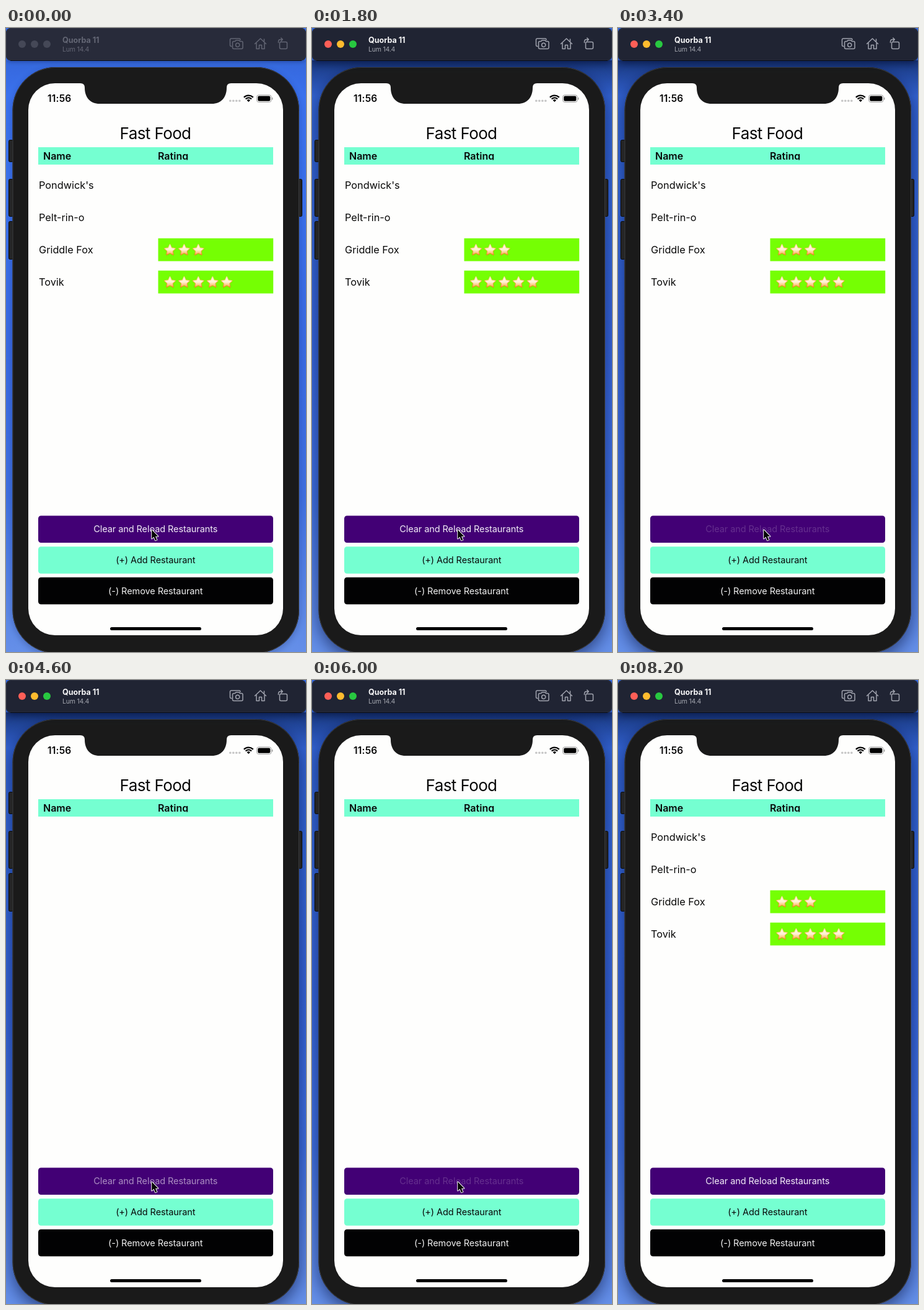
These frames come from a looping animation (484 by 1005 pixels, 8.4 s). An HTML page with a canvas:

```html
<!DOCTYPE html>
<html lang="en">
<head>
<meta charset="utf-8">
<title>Fast Food</title>
<style>
html, body { margin: 0; width: 100%; height: 100%; overflow: hidden; background: #356be0; }
canvas { display: block; width: 484px; height: 1005px; }
</style>
</head>
<body>
<canvas id="stage"></canvas>
<script>
const W = 484, H = 1005, LOOP = 8400, STEP = 200;
const canvas = document.getElementById('stage');
const dpr = window.devicePixelRatio || 1;
canvas.width = W * dpr;
canvas.height = H * dpr;
const ctx = canvas.getContext('2d');
ctx.scale(dpr, dpr);

const MINT = '#75ffd1', LIME = '#75ff03', PAPER = '#fefefd';
const ROWS = [['Pondwick\'s', 0], ['Pelt-rin-o', 0], ['Griddle Fox', 3], ['Tovik', 5]];

// Moments of the two long presses, in ms
const ACTIVE = 600, CLEARED = 4600, RELOADED = 7000, CURSOR_GONE = 7200;
const PRESSES = [[1900, 4475], [5300, 6850]];

function rect(x, y, w, h, r, fill, stroke, width = 1) {
  ctx.beginPath();
  ctx.roundRect(x, y, w, h, r);
  if (fill) { ctx.fillStyle = fill; ctx.fill(); }
  if (stroke) { ctx.strokeStyle = stroke; ctx.lineWidth = width; ctx.stroke(); }
}

function disc(x, y, r, fill) {
  ctx.beginPath();
  ctx.arc(x, y, r, 0, Math.PI * 2);
  ctx.fillStyle = fill;
  ctx.fill();
}

function text(str, x, y, size, { color = '#080808', weight = 400, align = 'left', gap = 0 } = {}) {
  ctx.font = `${weight} ${size}px Inter, Roboto, sans-serif`;
  ctx.letterSpacing = gap + 'px';
  ctx.textAlign = align;
  ctx.fillStyle = color;
  ctx.fillText(str, x, y);
}

function vertical(y0, y1, ...stops) {
  const g = ctx.createLinearGradient(0, y0, 0, y1);
  stops.forEach((c, i) => g.addColorStop(i / (stops.length - 1), c));
  return g;
}

function withShadow(color, blur, dy, draw) {
  ctx.save();
  ctx.shadowColor = color;
  ctx.shadowBlur = blur * dpr;
  ctx.shadowOffsetY = dy * dpr;
  draw();
  ctx.restore();
}

function shade(y0, y1, alpha) {
  ctx.fillStyle = vertical(y0, y1, `rgba(0,12,45,${alpha})`, 'rgba(0,12,45,0)');
  ctx.fillRect(0, y0, W, y1 - y0);
}

function desktop(active) {
  ctx.fillStyle = vertical(0, H, '#3b72f0', '#3a70ec', '#3969e2', '#3f6fe0', '#658fe8');
  ctx.fillRect(0, 0, W, H);
  shade(52, 110, active ? 0.5 : 0.1);
  if (active) shade(52, 700, 0.18);
}

function deviceButton(x, y, w, h) {
  rect(x, y, w, h, 2, '#252525', '#090909');
}

function phone(active) {
  withShadow(active ? 'rgba(0,10,50,.55)' : 'rgba(0,10,50,.25)', active ? 26 : 12, active ? 10 : 4,
    () => rect(10.5, 63, 462.5, 944, 69, '#1b1b1b'));
  deviceButton(4.5, 180.5, 7, 35);
  deviceButton(4.5, 243.5, 7, 60);
  deviceButton(4.5, 311.5, 7, 61);
  deviceButton(471.5, 243.5, 6, 60);
  rect(11, 63.5, 461.5, 943, 69, '#1a1a1a', '#3d3e40');
  rect(36, 89, 411, 889, 43, PAPER);
  notch();
}

function notch() {
  ctx.beginPath();
  ctx.moveTo(120, 88);
  ctx.lineTo(120, 89);
  ctx.quadraticCurveTo(127, 89, 127, 96);
  ctx.bezierCurveTo(127, 112, 136, 122, 151, 122);
  ctx.lineTo(332, 122);
  ctx.bezierCurveTo(347, 122, 356, 112, 356, 96);
  ctx.quadraticCurveTo(356, 89, 363, 89);
  ctx.lineTo(363, 88);
  ctx.closePath();
  ctx.fillStyle = '#1a1a1a';
  ctx.fill();
}

function strokePath(d, color, width = 1.5) {
  ctx.strokeStyle = color;
  ctx.lineWidth = width;
  ctx.lineJoin = ctx.lineCap = 'round';
  ctx.stroke(new Path2D(d));
}

function titleBar(active) {
  withShadow(active ? 'rgba(0,8,40,.6)' : 'rgba(0,8,40,.3)', active ? 14 : 7, active ? 4 : 2,
    () => rect(0, 0, W, 52.5, 8, '#111622'));
  rect(0.5, 0.5, W - 1, 51.5, 8, active ? '#202433' : '#282b3a', active ? '#2c303e' : '#303442');
  ctx.fillStyle = '#090c14';
  ctx.fillRect(7, 52, W - 14, 1);

  const lights = active ? ['#fe5f57', '#febb2e', '#28c840'] : Array(3).fill('#454857');
  lights.forEach((c, i) => disc(26 + i * 20, 26, 6, c));
  text('Quorba 11', 91, 24, 12.5, { weight: 700, color: active ? '#f7f7f8' : '#646775' });
  text('Lum 14.4', 91, 38, 10.5, { color: active ? '#a3a6af' : '#646775', gap: -0.2 });

  const ink = active ? '#a0a3ae' : '#626573';
  strokePath('M364 29.5H363.5Q361.5 29.5 361.5 27.5V19Q361.5 17 363.5 17H376Q378 17 378 19', ink);
  strokePath('M367.5 21.5H369.5L371 19.8H376L377.5 21.5H380Q382 21.5 382 23.5V31.5Q382 33.5 380 33.5H367.5Q365.5 33.5 365.5 31.5V23.5Q365.5 21.5 367.5 21.5Z', ink);
  strokePath('M376.8 27.3A3.1 3.1 0 1 1 370.6 27.3A3.1 3.1 0 1 1 376.8 27.3Z', ink);
  strokePath('M401.5 25.5L410.5 17L419.5 25.5M404 24V33.5H408.5V27.5H412.5V33.5H417V24M416.5 18V21.5', ink);
  strokePath('M443.5 22.5H451.5Q453.5 22.5 453.5 24.5V31.5Q453.5 33.5 451.5 33.5H443.5Q441.5 33.5 441.5 31.5V24.5Q441.5 22.5 443.5 22.5Z', ink);
  strokePath('M439.5 23.5V22Q439.5 18.5 443 18.5H446M443.8 16L446.3 18.5L443.8 21', ink);
}

function statusBar() {
  text('11:56', 67, 119, 15.5, { weight: 600, gap: 0.2 });
  for (let i = 0; i < 4; i++) disc(361.8 + i * 5, 117.3, 1.8, '#c6c6c6');
  for (const r of [10.2, 6.4]) {
    ctx.beginPath();
    ctx.arc(391.3, 118.8, r, -Math.PI * 0.76, -Math.PI * 0.24);
    ctx.strokeStyle = '#050505';
    ctx.lineWidth = 2.3;
    ctx.lineCap = 'butt';
    ctx.stroke();
  }
  ctx.beginPath();
  ctx.moveTo(391.3, 119.2);
  ctx.arc(391.3, 118.8, 3.7, -Math.PI * 0.76, -Math.PI * 0.24);
  ctx.fillStyle = '#050505';
  ctx.fill();
  rect(404.5, 107.9, 23.5, 11.6, 3.4, null, '#a0a0a0');
  rect(406.2, 109.6, 20.1, 8.2, 2, '#000');
  rect(429, 111.8, 1.4, 4, 1, '#a0a0a0');
}

function star(x, y) {
  ctx.beginPath();
  for (let i = 0; i < 10; i++) {
    const r = i % 2 ? 4.5 : 9, a = -Math.PI / 2 + i * Math.PI / 5;
    ctx.lineTo(x + r * Math.cos(a), y + r * Math.sin(a));
  }
  ctx.closePath();
  ctx.lineJoin = 'round';
  ctx.lineWidth = 1.8;
  ctx.strokeStyle = vertical(y - 9, y + 8, '#f3d878', '#f3ab35', '#ea7a1c');
  ctx.stroke();
  ctx.fillStyle = vertical(y - 8, y + 7, '#fff9df', '#fff1d2', '#fbae4c');
  ctx.fill();
}

function table(showRows) {
  text('Fast Food', 241, 178.5, 26, { align: 'center', gap: -0.6 });
  ctx.fillStyle = MINT;
  ctx.fillRect(52, 192, 379, 28);
  ctx.save();
  ctx.beginPath();
  ctx.rect(52, 192, 379, 20.5);
  ctx.clip();
  text('Name', 60, 212, 16, { weight: 600 });
  text('Rating', 245, 212, 16, { weight: 600 });
  ctx.restore();

  if (!showRows) return;
  ROWS.forEach(([name, rating], i) => {
    const y = 253 + i * 52;
    text(name, 53, y + 6, 16.3);
    if (!rating) return;
    ctx.fillStyle = LIME;
    ctx.fillRect(245.5, y - 18.3, 185.7, 36.8);
    for (let s = 0; s < rating; s++) star(264.5 + s * 22.9, y + 0.8);
  });
}

function button(label, y, h, fill, color, alpha = 1) {
  rect(52, y, 379, h, 4.5, fill);
  ctx.globalAlpha = alpha;
  text(label, 241.3, y + h / 2 + 5.2, 14.5, { color, align: 'center', gap: -0.08 });
  ctx.globalAlpha = 1;
}

function cursor() {
  const arrow = new Path2D('M235.2 808.2V822.6L238.5 819.5L241 825.4L243.4 824.4L241 818.7H245.4Z');
  ctx.lineJoin = 'round';
  ctx.lineWidth = 2;
  ctx.strokeStyle = '#f4f4f4';
  ctx.stroke(arrow);
  ctx.fillStyle = '#050505';
  ctx.fill(arrow);
}

const clamp = v => Math.min(1, Math.max(0, v));
const ease = v => v < 0.5 ? 2 * v * v : 1 - 2 * (1 - v) * (1 - v);

function labelAlpha(t) {
  let a = 1;
  for (const [down, up] of PRESSES) {
    a -= 0.8 * (ease(clamp((t - down) / 150)) - ease(clamp((t - up) / 250)));
  }
  return a;
}

function draw(t) {
  const active = t >= ACTIVE;
  desktop(active);
  phone(active);
  titleBar(active);
  statusBar();
  table(t < CLEARED || t >= RELOADED);
  button('Clear and Reload Restaurants', 785.5, 43.5, '#420075', '#f3edf7', labelAlpha(t));
  button('(+) Add Restaurant', 835.3, 43.5, MINT, '#080808');
  button('(-) Remove Restaurant', 884.8, 43.5, '#020203', '#f1f1f1');
  rect(168, 965, 147, 5, 2.5, '#000');
  if (t < CURSOR_GONE) cursor();
}

function tick() {
  const t = performance.now() % LOOP;
  draw(Math.floor(t / STEP) * STEP);
  requestAnimationFrame(tick);
}
tick();
</script>
</body>
</html>
```
